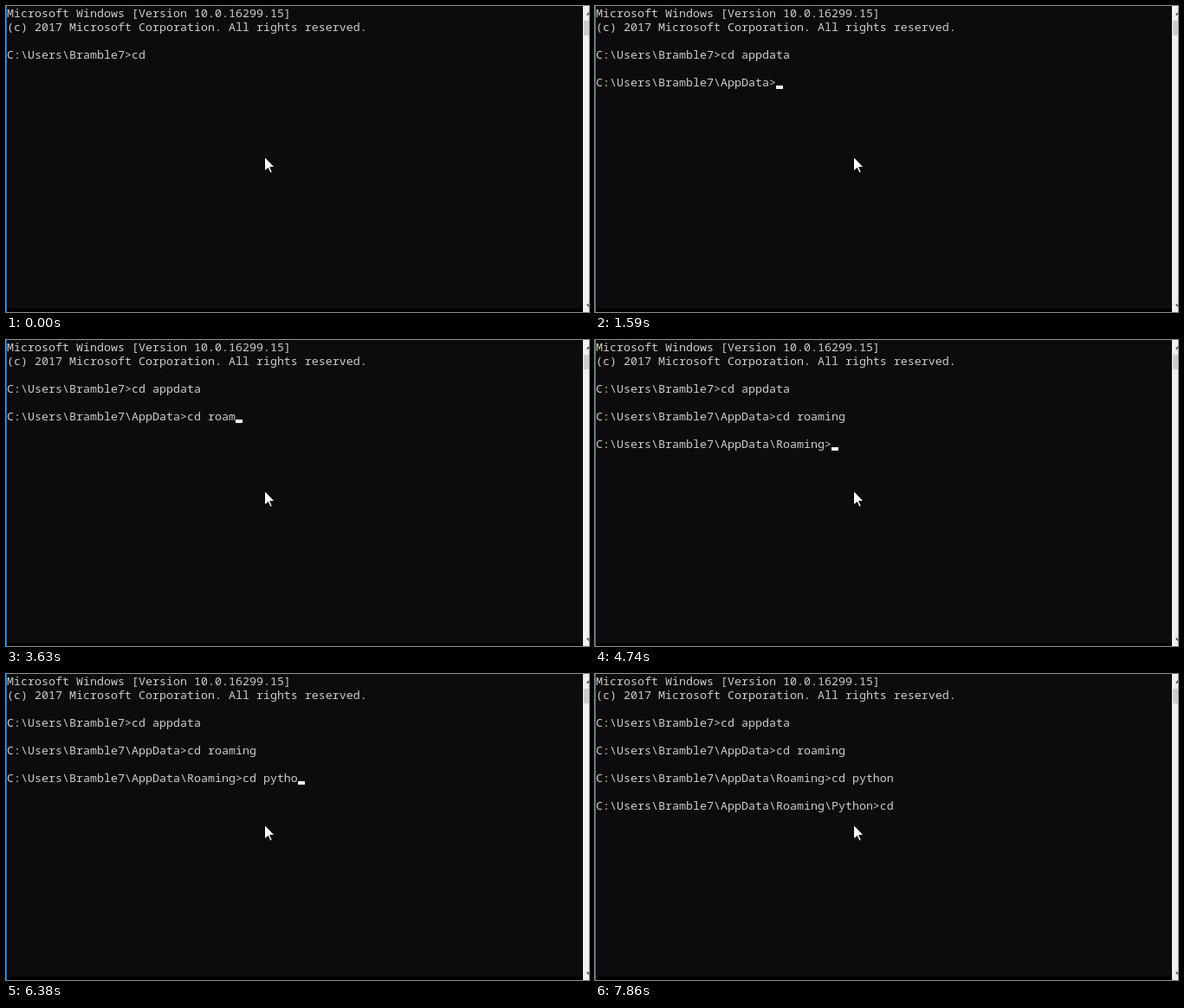
These frames come from a looping animation (673 by 354 pixels, 8000 ms). An HTML page:

```html
<!DOCTYPE html>
<html lang="en">
<head>
<meta charset="utf-8">
<title>Console session</title>
<style>
  html, body { margin: 0; width: 100%; height: 100%; overflow: hidden; background: #0c0c0c; }
  svg { display: block; }
  text { font: 13.3333px "Noto Sans Mono", monospace; fill: #ccc; white-space: pre; }
</style>
</head>
<body>
<svg width="673" height="354" viewBox="0 0 673 354">
  <rect width="673" height="354" fill="#0c0c0c"/>
  <rect y="350" width="666" height="4" fill="#000"/>
  <rect width="1" height="354" fill="#1879c8"/>
  <g id="screen"></g>
  <rect id="caret" width="8" height="4" fill="#f3f3f3"/>
  <g id="scrollbar">
    <rect x="666" width="7" height="354" fill="#f0f0f0"/>
    <rect x="667" y="17" width="6" height="17" fill="#cdcdcd"/>
    <path d="M670.7 10.6l4-4M670.7 344.9l4 4" fill="none" stroke="#505050" stroke-width="1.7"/>
  </g>
  <path id="pointer" d="M298.5 174.5v16.5l4-3.5 2.6 5.7 2.3-1-2.6-5.7h5.3z" fill="#fff" stroke="#000"/>
</svg>
<script>
const LOOP = 8000, CELL = 8, ROW = 16, LEFT = 1, BASE = 13;
const home = 'C:\\Users\\Bramble7';
const banner = [
  'Microsoft Windows [Version 10.0.16299.15]',
  '(c) 2017 Microsoft Corporation. All rights reserved.'
];
const prompts = ['', '\\AppData', '\\AppData\\Roaming', '\\AppData\\Roaming\\Python']
  .map(dir => home + dir + '>');

// [time in ms, keys typed, caret visible]
const keys = [
  [0, 'cd ', 0], [120, 'a', 1], [240, 'p', 1], [360, '', 0],
  [610, 'p', 0], [730, 'd', 0], [850, 'a', 1], [1100, 't', 1], [1220, 'a', 1],
  [1590, '\n', 1], [2090, 'c', 0], [2340, 'd', 0], [2460, ' ', 1],
  [2610, 'r', 0], [2750, 'o', 1], [3260, 'a', 0], [3380, '', 1],
  [3630, 'm', 1], [3750, 'i', 1], [3870, '', 0], [4120, 'ng', 1], [4240, '', 0],
  [4740, '\n', 1], [5240, 'c', 0], [5360, 'd', 0], [5480, ' ', 0],
  [5610, 'p', 0], [5730, '', 1], [5880, 'y', 1], [6000, 't', 1],
  [6140, 'h', 0], [6260, 'o', 0], [6380, '', 1], [6750, 'n', 1], [6870, '', 0],
  [6990, '\n', 1], [7490, 'c', 1], [7740, 'd', 1], [7860, ' ', 0]
];

const screen = document.getElementById('screen');
const caret = document.getElementById('caret');

function addLine(row, value = '') {
  const line = document.createElementNS('http://www.w3.org/2000/svg', 'text');
  line.setAttribute('x', LEFT);
  line.setAttribute('y', row * ROW + BASE);
  line.textContent = value;
  screen.appendChild(line);
  return line;
}

const promptRow = i => 3 + 2 * i;
banner.forEach((value, row) => addLine(row, value));
const lines = prompts.map((_, i) => addLine(promptRow(i)));

function draw(ms) {
  const past = keys.filter(([at]) => at <= ms);
  const typed = past.map(key => key[1]).join('').split('\n');
  const visible = past[past.length - 1][2];
  lines.forEach((line, i) => {
    const value = i < typed.length ? prompts[i] + typed[i] : '';
    if (line.textContent !== value) line.textContent = value;
  });
  const last = typed.length - 1;
  const column = prompts[last].length + typed[last].length;
  caret.setAttribute('x', LEFT + column * CELL);
  caret.setAttribute('y', (promptRow(last) + 1) * ROW - 4);
  caret.setAttribute('visibility', visible ? 'visible' : 'hidden');
}

const start = performance.now();
function tick() {
  draw((performance.now() - start) % LOOP);
  requestAnimationFrame(tick);
}
tick();
</script>
</body>
</html>
```
